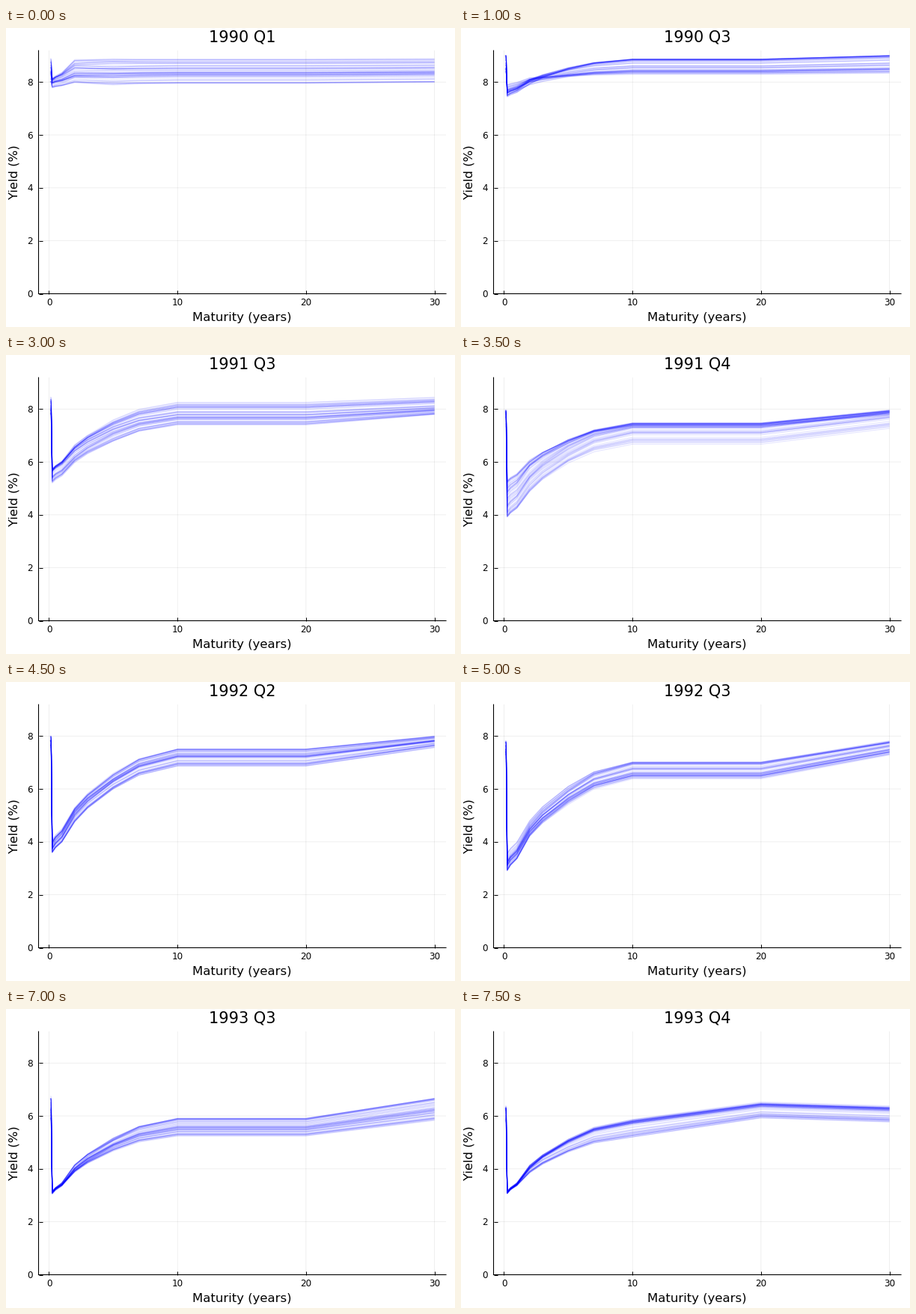
Write a matplotlib script that moves like this. It is 600 px wide and 400 px high and loops after 8000 ms.

```python
import numpy as np
import matplotlib.pyplot as plt
from matplotlib.animation import FuncAnimation
from matplotlib.collections import LineCollection

W, H, DPI = 600, 400, 100
PX = 72 / DPI
QUARTERS, DAYS = 16, 62

plt.rcParams["font.family"] = "DejaVu Sans"
plt.rcParams["path.snap"] = False

MATURITIES = [1 / 12, 1 / 6, 0.25, 0.5, 1, 2, 3, 5, 7, 10, 20, 30]

# Turning points as (quarters since the start, percent)
TEN_YEAR = [(0, 7.97), (0.4, 8.45), (1.35, 9.0), (1.9, 8.43), (2.25, 8.42),
            (2.75, 8.9), (3.1, 8.85), (4, 8.1), (4.4, 7.85), (5.8, 8.3),
            (7, 7.47), (7.5, 7.45), (8.05, 6.75), (8.8, 7.55), (10.2, 6.9),
            (10.8, 6.45), (11.5, 6.9), (12.75, 5.98), (13.6, 6.05),
            (15.1, 5.25), (15.5, 5.72), (16, 5.8)]
THREE_MONTH = [(0, 7.8), (0.6, 8.1), (1.8, 8.0), (2.35, 7.65), (3, 7.5),
               (4, 6.55), (4.4, 6.07), (6.3, 5.7), (7, 5.25), (8, 3.93),
               (8.8, 4.1), (9.9, 3.65), (10.3, 3.23), (10.9, 2.95),
               (11.7, 3.3), (12.2, 3.02), (14, 3.08), (16, 3.12)]
LONG_SPREAD = [(0, 0.04), (1.5, 0), (3, 0.14), (6, 0.19), (8, 0.6),
               (8.8, 0.46), (10.8, 0.9), (11.7, 0.72), (13, 0.87), (16, 0.48)]


def mix(a, b, t):
    return a + (b - a) * t


def eased(t, keys):
    x, y = np.array(keys).T
    i = np.clip(np.searchsorted(x, t, "right") - 1, 0, len(x) - 2)
    s = (t - x[i]) / (x[i + 1] - x[i])
    return mix(y[i], y[i + 1], s * s * (3 - 2 * s))


def drift(rng, sigma, n, keep=0.8):
    """Mean-reverting daily noise."""
    out = rng.normal(0, sigma, n)
    for d in range(1, n):
        out[d] += keep * out[d - 1]
    return out


def daily_curves():
    n = QUARTERS * DAYS
    t = np.arange(n) / DAYS
    rng = np.random.default_rng(7)

    y10 = eased(t, TEN_YEAR) + drift(rng, 0.035, n)
    m3 = eased(t, THREE_MONTH) + drift(rng, 0.02, n)
    y30 = y10 + eased(t, LONG_SPREAD)
    # The belly is nearly flat at first, then takes a steady hump shape
    flat = (1 - np.tanh(2 * (t - 1.8))) / 2
    y2 = mix(m3, y10, 0.36 + 0.64 * flat) + drift(rng, 0.02, n)
    y5 = mix(m3, y10, 0.73 + 0.26 * flat) + drift(rng, 0.015, n)
    y1 = mix(m3, y2, 0.34)
    m6 = mix(m3, y1, 0.45)
    y3, y7 = mix(y2, y5, 0.41), mix(y5, y10, 0.6)

    # Missing tenors carry the previous known yield forward
    y20 = np.where(t >= QUARTERS - 1, y30 + 0.15, y10)
    m1 = np.r_[y30[0], y30[:-1]]
    table = np.column_stack([m1, m1, m3, m6, y1, y2, y3, y5, y7, y10, y20, y30])
    return [np.column_stack([MATURITIES, row]) for row in table.round(2)]


CURVES = daily_curves()

fig = plt.figure(figsize=(W / DPI, H / DPI), dpi=DPI, facecolor="white")
LEFT, RIGHT, TOP, BOTTOM = 43.5, 588, 30.2, 355.5
ax = fig.add_axes([LEFT / W, 1 - BOTTOM / H, (RIGHT - LEFT) / W, (BOTTOM - TOP) / H])
ax.set_xlim(-0.814, 30.898)
ax.set_ylim(0, 9.187)
ax.set_xticks(range(0, 31, 10), [])
ax.set_yticks(range(0, 9, 2), [])
ax.tick_params(direction="in", length=5 * PX, width=PX)
ax.grid(color="black", alpha=0.1, linewidth=0.6 * PX)
ax.set_axisbelow(True)
ax.spines[["top", "right"]].set_visible(False)
ax.spines[["left", "bottom"]].set_linewidth(1.1 * PX)


def label(x, y, text, size, **kw):
    kw = {"ha": "center", "va": "baseline", **kw}
    return fig.text(x / W, 1 - y / H, text, fontsize=size * PX, **kw)


for v in range(0, 31, 10):
    label(57.5 + 17.17 * v, 371.4, str(v), 12)
for v in range(0, 9, 2):
    label(35.6, BOTTOM - 35.41 * v + 4.5, str(v), 12, ha="right")
label(315.7, 391.8, "Maturity (years)", 16.45)
label(15.6, 192.5, "Yield (%)", 16.45, rotation=90, rotation_mode="anchor")
title = label(315.6, 18.1, "", 20.9)

lines = LineCollection([], colors=[(0, 0, 1, 0.1)], linewidths=1.1 * PX, zorder=2)
ax.add_collection(lines, autolim=False)


def update(i):
    title.set_text(f"{1990 + i // 4} Q{i % 4 + 1}")
    lines.set_segments(CURVES[i * DAYS:(i + 1) * DAYS])
    return title, lines


anim = FuncAnimation(fig, update, frames=QUARTERS, interval=500, repeat=True)
plt.show()
```
